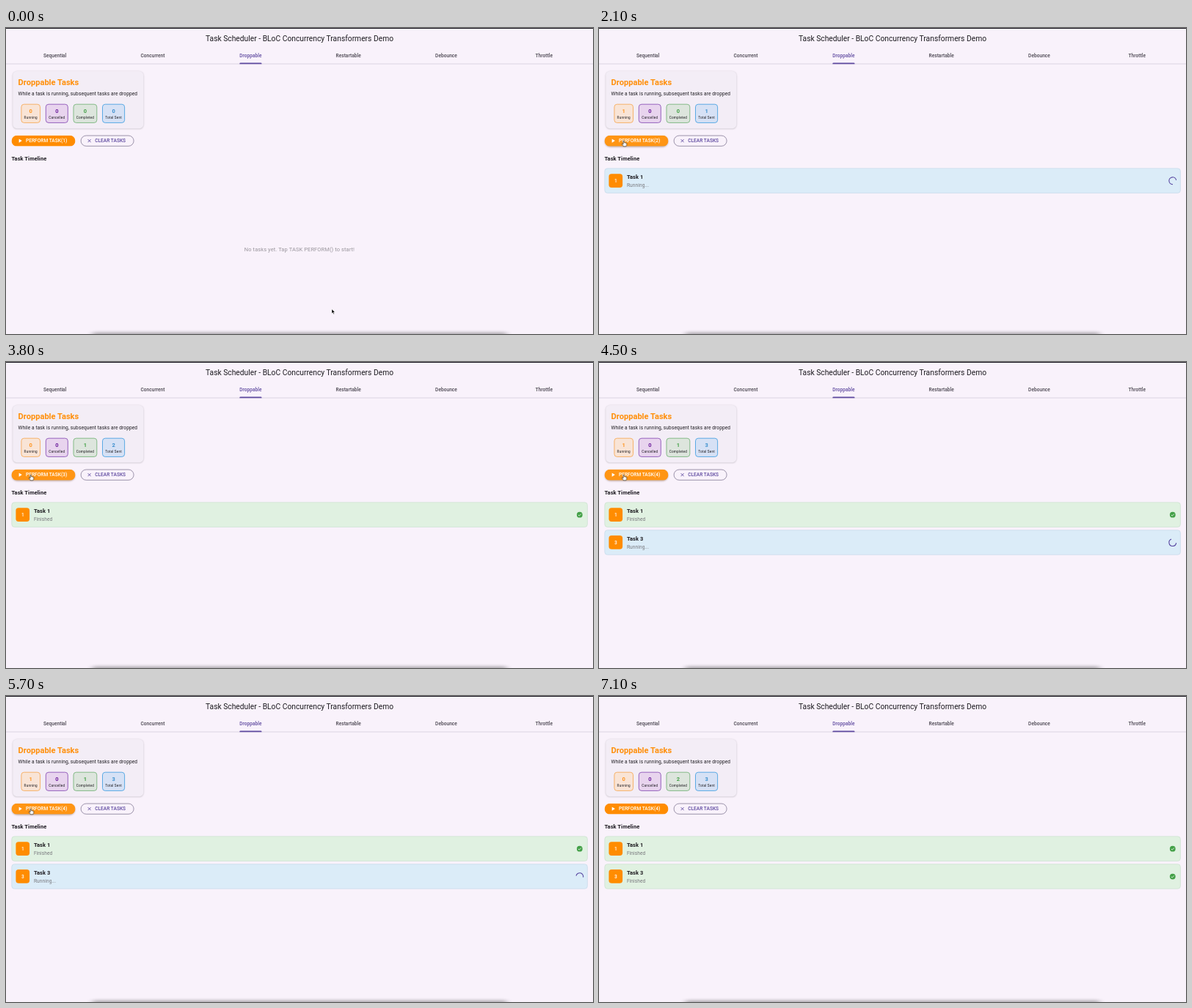
An HTML page that plays this animation: 800x418 px, repeating every 7200 ms.

```html
<!DOCTYPE html>
<html lang="en">
<head>
<meta charset="utf-8">
<title>Task Scheduler</title>
<style>
  html, body { margin: 0; width: 100%; height: 100%; overflow: hidden; background: #f9f2fb; }
  svg { display: block; width: 800px; height: 418px; font: 400 6.55px Roboto, sans-serif; }
  .mid { text-anchor: middle; }
  .tabs { font-weight: 500; letter-spacing: .047px; fill: #49454f; }
  .body { letter-spacing: .117px; }
  .head { font-weight: 700; font-size: 7.49px; letter-spacing: .07px; fill: #1d1b20; }
  .count { font-weight: 700; font-size: 7.49px; }
  .label { font-size: 4.68px; letter-spacing: .187px; fill: #1d1b20; }
  .button { font-weight: 500; letter-spacing: .047px; }

  .pointer, .arrow, .hand, .hover, .ripple { animation: 7200ms linear infinite; }
  .pointer { animation-name: move; }
  .arrow { animation-name: arrow; animation-timing-function: step-end; }
  .hand { animation-name: hand; animation-timing-function: step-end; }
  .hover { animation-name: hover; }
  .ripple { animation-name: ripple; }

  @keyframes move {
    0%, .7% { transform: translate(444px, 384px); }
    2.6%, 4.9% { transform: translate(45px, 105px); }
    8%, 100% { transform: translate(33.6px, 154px); }
  }
  @keyframes arrow { 0% { opacity: 1; } 6.7%, 100% { opacity: 0; } }
  @keyframes hand { 0% { opacity: 0; } 6.7% { opacity: 1; } 91.4%, 100% { opacity: 0; } }
  @keyframes hover { 0%, 6.7% { opacity: 0; } 8.3%, 91.4% { opacity: 1; } 93.5%, 100% { opacity: 0; } }
  @keyframes ripple {
    0%, 16.2% { r: 4px; opacity: 0; }
    16.6% { r: 10px; opacity: 1; }
    19.4% { r: 66px; opacity: 1; }
    22%, 42.9% { r: 66px; opacity: 0; }
    43% { r: 4px; opacity: 0; }
    43.4% { r: 10px; opacity: 1; }
    45% { r: 66px; opacity: 1; }
    48%, 55.1% { r: 66px; opacity: 0; }
    55.2% { r: 4px; opacity: 0; }
    55.6% { r: 10px; opacity: 1; }
    57.2% { r: 66px; opacity: 1; }
    60%, 100% { r: 66px; opacity: 0; }
  }
</style>
</head>
<body>
<svg viewBox="0 0 800 418">
  <defs>
    <filter id="soft" x="-20%" y="-60%" width="140%" height="220%"><feGaussianBlur stdDeviation="1"/></filter>
    <filter id="dock" x="-10%" y="-300%" width="120%" height="700%"><feGaussianBlur stdDeviation="4 2"/></filter>
    <clipPath id="pill"><rect x="7.5" y="146.7" width="87" height="14.9" rx="7.45"/></clipPath>
  </defs>

  <rect width="800" height="418" fill="#f9f2fb"/>
  <rect width="800" height="1" fill="#1b1820"/>
  <rect x="118" y="416" width="564" height="6" fill="#000" opacity=".32" filter="url(#dock)"/>

  <text class="mid" x="400" y="17.5" font-size="10.29" fill="#1d1b20">Task Scheduler - BLoC Concurrency Transformers Demo</text>
  <g id="tabs" class="tabs mid"></g>
  <rect y="48.7" width="800" height=".6" fill="#c6bfcc"/>
  <path d="M318.3 49.2v-.4q0-1.3 1.3-1.3h27.6q1.3 0 1.3 1.3v.4z" fill="#5f4aa0"/>

  <rect x="9.3" y="59.6" width="178" height="78.2" rx="5.6" fill="#000" opacity=".2" filter="url(#soft)"/>
  <rect x="9.3" y="59" width="178" height="78.2" rx="5.6" fill="#f3edf6"/>
  <text x="16.6" y="78" font-size="11.1" font-weight="700" fill="#ff8f0a">Droppable Tasks</text>
  <text class="body" x="16.6" y="92.2" fill="#1d1b20">While a task is running, subsequent tasks are dropped</text>
  <g id="chips" class="mid"></g>

  <g class="button">
    <rect class="hover" x="8" y="148" width="86" height="14.6" rx="7.3" fill="#5a3000" fill-opacity=".4" filter="url(#soft)"/>
    <g clip-path="url(#pill)">
      <rect x="7.5" y="146.7" width="87" height="14.9" fill="#ff8c00"/>
      <rect class="hover" x="7.5" y="146.7" width="87" height="14.9" fill="#fff" fill-opacity=".08"/>
      <circle class="ripple" cx="33.6" cy="154" r="4" fill="#fff" fill-opacity=".1"/>
    </g>
    <path d="M17.6 151.4v5.4l4.2-2.7z" fill="#fff"/>
    <text id="perform" x="27" y="156.4" fill="#fff"></text>
    <rect x="102.1" y="147" width="72" height="14.3" rx="7.15" fill="none" stroke="#746b88" stroke-width=".7"/>
    <path d="M111.6 152.1l4 4m0-4l-4 4" stroke="#5f4aa0" stroke-width=".9"/>
    <text x="121.2" y="156.4" fill="#5f4aa0">CLEAR TASKS</text>
  </g>

  <text class="head" x="7.5" y="180.7">Task Timeline</text>
  <text id="empty" class="mid" x="400" y="305" font-size="7.49" letter-spacing=".1" fill="#99959c">No tasks yet. Tap TASK PERFORM() to start!</text>
  <g id="rows"></g>

  <g class="pointer">
    <path class="arrow" d="M0 0v6l1.4-1.3 1 2.3 1-.4-1-2.3h1.9z" fill="#000" stroke="#fff" stroke-width=".5"/>
    <path class="hand" d="M-.7.4Q0-.6.7.4V2.7q.6-.4 1.1.1.7-.3 1.1.2 1-.2 1.1.8V5.4Q4 6.6 3.2 7.8H-.3Q-1-.3+6.6-2.1 5q-.5-1 .4-1 .6.1 1 .8z" fill="#fff" stroke="#111" stroke-width=".6" stroke-linejoin="round"/>
  </g>
</svg>
<script>
const LOOP = 7200;
const clicks = [1360, 3180, 4080];
const tasks = [
  { id: 1, from: 1360, to: 3380, y: 191.6 },
  { id: 3, from: 4080, to: 6180, y: 229.5 }
];
const $ = id => document.getElementById(id);
const setText = (el, text) => { if (el.textContent !== text) el.textContent = text; };

document.querySelector('.hand').setAttribute('d',
  'M-.7 .4Q0 -.6 .7 .4V2.7Q1.3 2.3 1.8 2.8Q2.5 2.5 2.9 3Q3.9 2.8 4 3.8V5.4Q4 6.6 3.2 7.8H-.3Q-1 6.4 -2.1 5Q-2.6 4 -1.7 4Q-1.1 4.1 -.7 4.8Z');

$('tabs').innerHTML = ['Sequential', 'Concurrent', 'Droppable', 'Restartable', 'Debounce', 'Throttle']
  .map((name, i) => `<text x="${(i + .5) * 800 / 6}" y="40.2"${i === 2 ? ' fill="#5f4aa0"' : ''}>${name}</text>`).join('');

const chips = [
  ['Running', 20.9, 25.6, '#f9e4d6', '#f7ac5c', '#ff9420'],
  ['Cancelled', 54.3, 30, '#e8d4ee', '#8d55b8', '#6a1b9a'],
  ['Completed', 92, 31.8, '#dde5dd', '#79b57c', '#43a047'],
  ['Total Sent', 131.5, 30.1, '#d6e1f5', '#4ba3e3', '#3c8fce']
];
$('chips').innerHTML = chips.map(([name, x, w, bg, line, ink]) => `
  <rect x="${x}" y="104.2" width="${w}" height="25.2" rx="3.7" fill="${bg}" stroke="${line}" stroke-width=".9"/>
  <text class="count" x="${x + w / 2}" y="116.2" fill="${ink}"></text>
  <text class="label" x="${x + w / 2}" y="124.1">${name}</text>`).join('');
const counts = [...document.querySelectorAll('.count')];

$('rows').innerHTML = tasks.map(({ id, y }) => `
  <g transform="translate(0 ${y})">
    <rect class="box" x="7.8" y=".2" width="784.6" height="33.6" rx="3.7" stroke-width=".6"/>
    <rect x="13.4" y="7.6" width="18.7" height="18.7" rx="3.7" fill="#ff8c00"/>
    <text class="mid" x="22.8" y="19.3" font-weight="500" fill="#fff">${id}</text>
    <text class="head" x="37.9" y="14">Task ${id}</text>
    <text class="body status" x="37.9" y="25.7" fill="#77777c"></text>
    <path class="spin" fill="none" stroke="#5745a0" stroke-width="1.1"/>
    <g class="done">
      <circle cx="781.8" cy="17.1" r="3.9" fill="#43a047"/>
      <path d="M779.8 17.2l1.4 1.4 2.6-2.7" fill="none" stroke="#fff" stroke-width=".8"/>
    </g>
  </g>`).join('');
const rows = [...$('rows').children];

// cubic-bezier(.4, 0, .2, 1)
function ease(x) {
  let lo = 0, hi = 1;
  for (let i = 0; i < 20; i++) {
    const s = (lo + hi) / 2, r = 1 - s;
    if (1.2 * r * r * s + .6 * r * s * s + s ** 3 < x) lo = s; else hi = s;
  }
  return lo * lo * (3 - 2 * lo);
}
const clamp = v => Math.min(1, Math.max(0, v));

function arc(t) {
  const cycle = t / 1333 % 1, turn = Math.PI * 2;
  const head = ease(clamp(cycle * 2)), tail = ease(clamp(cycle * 2 - 1));
  const start = turn * (-.25 + tail * .75 + t / 2222 + cycle * .25);
  const sweep = Math.max(turn * .75 * (head - tail), .02);
  const at = a => `${781.8 + 4.9 * Math.cos(a)} ${17.1 + 4.9 * Math.sin(a)}`;
  return `M${at(start)}A4.9 4.9 0 ${+(sweep > Math.PI)} 1 ${at(start + sweep)}`;
}

function drawRow(row, task, t) {
  row.style.display = t < task.from ? 'none' : '';
  if (t < task.from) return;
  const done = t >= task.to, part = name => row.querySelector(name);
  part('.box').setAttribute('fill', done ? '#e0f1e1' : '#dbecf8');
  part('.box').setAttribute('stroke', done ? '#c5dec9' : '#bfd5e6');
  setText(part('.status'), done ? 'Finished' : 'Running...');
  part('.done').style.display = done ? '' : 'none';
  part('.spin').style.display = done ? 'none' : '';
  if (!done) part('.spin').setAttribute('d', arc(t - task.from));
}

function draw(t) {
  const sent = clicks.filter(c => t >= c).length;
  const finished = tasks.filter(k => t >= k.to).length;
  const running = tasks.filter(k => t >= k.from).length - finished;
  [running, 0, finished, sent].forEach((n, i) => setText(counts[i], String(n)));
  setText($('perform'), `PERFORM TASK(${sent + 1})`);
  $('empty').style.display = sent ? 'none' : '';
  tasks.forEach((task, i) => drawRow(rows[i], task, t));
}

let origin;
function tick(now) {
  origin ??= now;
  draw((now - origin) % LOOP);
  requestAnimationFrame(tick);
}
draw(0);
requestAnimationFrame(tick);
</script>
</body>
</html>
```
